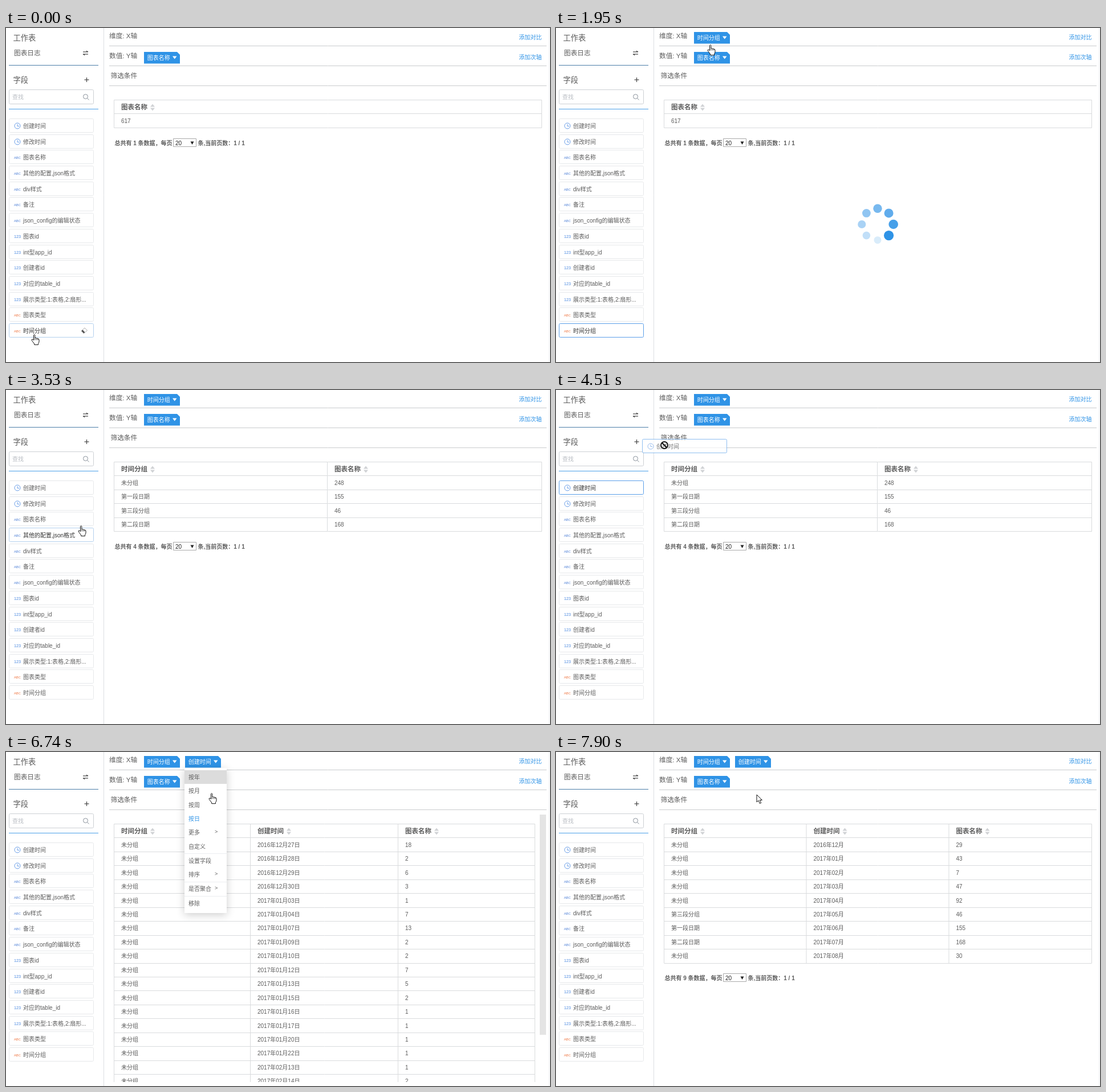
Recreate the animation shown at these times as an HTML page with a canvas. Size 954 px wide and 587 px high, loop 8000 ms.

```html
<!DOCTYPE html>
<html lang="zh-CN">
<head>
<meta charset="utf-8">
<title>图表编辑</title>
<style>
html, body { margin: 0; width: 100%; height: 100%; overflow: hidden; background: #fff; }
canvas { display: block; }
</style>
</head>
<body>
<canvas id="stage" width="954" height="587"></canvas>
<script>
const ctx = document.getElementById('stage').getContext('2d');
const LOOP = 8000, STEP = 88.3;
const FONT = '"Liberation Sans", "Noto Sans CJK SC", "Noto Sans CJK JP", "Noto Sans CJK", sans-serif';
const CENTERED = '"Liberation Sans", "Noto Sans CJK TC", "Noto Sans CJK", sans-serif'; // centred punctuation
const BLUE = '#2f93e6', INK = '#5c5c5c';
const FIELDS = ['创建时间', '修改时间', '图表名称', '其他的配置,json格式', 'div样式', '备注',
  'json_config的编辑状态', '图表id', 'int型app_id', '创建者id', '对应的table_id',
  '展示类型:1:表格,2:扇形...', '图表类型', '时间分组'];
const ROW = 27.69, FIRST = 172;

// Pointer hot spot: time, x, y
const PATH = [[0, 49, 538], [90, 49, 538], [180, 57, 527.5], [330, 57, 527.5], [971, 249, 62.5],
  [1150, 267, 26], [1330, 270, 28], [1943, 270, 29], [2290, 215, 115], [3170, 122, 296],
  [3440, 130, 250], [3532, 131, 238], [4060, 43, 170], [4120, 43, 170], [4950, 361, 11],
  [5120, 350, 15], [5380, 350, 15], [5400, 349, 14], [6130, 349, 14], [6300, 360, 14],
  [6540, 360, 14], [6622, 360, 45], [6711, 360, 72], [6970, 360, 91], [7150, 360, 91],
  [7630, 353, 75], [7810, 352, 75], [LOOP, 352, 75]];
const DRAGS = [
  { field: 13, press: 180, start: 360, drop: 1500, done: 2280, dx: 52, dy: 8 },
  { field: 0, press: 4100, start: 4150, drop: 5380, done: 5730, dx: 38, dy: 10 }];
const MENU_OPEN = 6470, MENU_CLOSE = 7810;

const day = s => `20${s.slice(0, 2)}年${s.slice(2, 4)}月${s.slice(4)}日`;
const DAYS = '161227 161228 161229 161230 170103 170104 170107 170109 170110 170112 170113 170115 170116 170117 170120 170122 170213 170214'.split(' ');
const DAY_COUNTS = [18, 2, 6, 3, 1, 7, 13, 2, 2, 7, 5, 2, 1, 1, 1, 1, 1, 2];
const MONTHS = ['2016年12月', ...[1, 2, 3, 4, 5, 6, 7, 8].map(m => `2017年0${m}月`)];
const MONTH_COUNTS = [29, 43, 7, 47, 92, 46, 155, 168, 30];
const PARTS = { 5: '第三段分组', 6: '第一段日期', 7: '第二段日期' };
const TABLES = [
  { until: 2280, edges: [189.5, 939.5], head: ['图表名称'], rows: [[617]] },
  { until: 5730, edges: [189.5, 563.5, 939.5], head: ['时间分组', '图表名称'],
    rows: [['未分组', 248], ['第一段日期', 155], ['第三段分组', 46], ['第二段日期', 168]] },
  { until: 7900, edges: [189.5, 428.5, 687.5, 927.5], head: ['时间分组', '创建时间', '图表名称'], scroll: true,
    rows: DAYS.map((d, i) => ['未分组', day(d), DAY_COUNTS[i]]) },
  { until: LOOP, edges: [189.5, 439, 689, 939.5], head: ['时间分组', '创建时间', '图表名称'],
    rows: MONTHS.map((m, i) => [PARTS[i] || '未分组', m, MONTH_COUNTS[i]]) }];
// Label, centre y
const MENU = [['按年', 44], ['按月', 68], ['按周', 93], ['按日', 117], ['更多', 141, '>'], ['自定义', 166],
  ['设置字段', 191], ['排序', 215, '>'], ['是否聚合', 240, '>'], ['移除', 266]];

const HAND = new Path2D('M4 1.5Q5.2 -.5 6.3 1.5V7Q8 5.8 8.8 7.4Q10.4 6.5 11.2 8.2Q13.4 7.7 13.5 10V13Q13.4 15 12 16.5V18.7H5.2V17L1 11.5Q-.2 9.3 1.5 9Q2.8 9 4 10.8Z');
const ARROW = new Path2D('M0 0V13L3.1 10.3L5.3 15.5L7.6 14.5L5.4 9.5H9.4Z');

function text(s, x, y, size = 10, color = INK, weight = '', font = FONT) {
  ctx.font = `${weight} ${size}px ${font}`;
  ctx.fillStyle = color;
  ctx.fillText(s, x, y + size * 0.37);
}
function line(color, width, ...p) {
  ctx.strokeStyle = color;
  ctx.lineWidth = width;
  ctx.beginPath();
  for (let i = 0; i < p.length; i += 2) ctx.lineTo(p[i], p[i + 1]);
  ctx.stroke();
}
function poly(color, ...p) {
  ctx.fillStyle = color;
  ctx.beginPath();
  for (let i = 0; i < p.length; i += 2) ctx.lineTo(p[i], p[i + 1]);
  ctx.fill();
}
function circle(x, y, r, color, width) {
  ctx.beginPath();
  ctx.arc(x, y, r, 0, 7);
  ctx.fillStyle = ctx.strokeStyle = color;
  ctx.lineWidth = width;
  width ? ctx.stroke() : ctx.fill();
}
function box(x, y, w, h, border, radius = 2) {
  ctx.beginPath();
  ctx.roundRect(x, y, w, h, radius);
  ctx.fillStyle = '#fff';
  ctx.fill();
  ctx.strokeStyle = border;
  ctx.lineWidth = 1;
  ctx.stroke();
}

function pointer(t) {
  const i = Math.max(1, PATH.findIndex(k => k[0] > t));
  const [t0, x0, y0] = PATH[i - 1], [t1, x1, y1] = PATH[i];
  const f = Math.max(0, (t - t0) / (t1 - t0));
  return { x: x0 + (x1 - x0) * f, y: y0 + (y1 - y0) * f };
}
function rowAt({ x, y }) {
  const i = Math.round((y - FIRST) / ROW);
  const inside = x > 5 && x < 154 && Math.abs(y - FIRST - i * ROW) < 13;
  return inside && i >= 0 && i < FIELDS.length ? i : -1;
}

function field(i, x, y, state, eraser) {
  const c = y + 12.5;
  box(x, y, 148, 24, { active: '#5b9fe9', hover: '#b3d0ee' }[state] || '#e6e8ea');
  if (i < 2) {
    circle(x + 14.5, c, 5, '#6b9fe8', 1);
    line('#6b9fe8', 1, x + 14.5, c - 3, x + 14.5, c + .5, x + 17.5, c + .5);
  } else if (i > 6 && i < 12) text('123', x + 8.5, c + .5, 7.3, '#4d8ae0');
  else text('ABC', x + 8.5, c + .5, 5.8, i > 11 ? '#ee7440' : '#4d7fd6');
  text(FIELDS[i], x + 24.5, c, 10, state ? '#333' : INK);
  if (eraser) {
    line('#999', .8, x + 128.7, c - 1.5, x + 132.5, c - 5, x + 137, c - .5, x + 133, c + 3);
    poly('#555', x + 126.5, c + .5, x + 128.7, c - 1.7, x + 133, c + 2.8, x + 131, c + 5);
  }
}

function chip(label, x, y) {
  poly(BLUE, x, y, x + 58, y, x + 63, y + 5, x + 63, y + 20.5, x, y + 20.5);
  text(label, x + 5.7, y + 10.5, 10, '#fff');
  poly('#fff', x + 50, y + 7.5, x + 57.5, y + 7.5, x + 53.7, y + 12.5);
}

function sidebar(t, hover) {
  line('#dcdfe3', 1, 171.5, 0, 171.5, 587);
  text('工作表', 12.5, 17.5, 13.3);
  text('图表日志', 14, 44, 11.67);
  line('#444', 1.2, 135, 42, 144, 42);
  line('#444', 1.2, 135, 46, 144, 46);
  poly('#444', 141, 39.5, 144.5, 42, 141, 42);
  poly('#444', 138, 48.5, 134.5, 46, 138, 46);
  line('#4a7ea8', 1, 5, 65.5, 162, 65.5);
  text('字段', 12.5, 91.5, 13.3);
  line('#444', 1.2, 137.5, 91, 145.5, 91);
  line('#444', 1.2, 141.5, 87, 141.5, 95);
  box(5.5, 108.5, 148, 25, '#ccd0d4');
  text('查找', 11, 121, 10, '#b8bcc2');
  circle(139.5, 120.5, 4, '#858d98', 1);
  line('#858d98', 1, 142.5, 123.5, 145.5, 126.5);
  line('#4a9fe8', 1.2, 5, 142.5, 162, 142.5);
  FIELDS.forEach((_, i) => {
    const held = DRAGS.some(d => d.field === i && t >= d.press && t < d.done);
    const grabbed = DRAGS.some(d => d.field === i && t >= d.press && t < d.drop);
    const state = held ? 'active' : hover === i ? 'hover' : '';
    field(i, 5.5, Math.round(FIRST + i * ROW) - 12.5, state, i > 11 && (grabbed || hover === i));
  });
}

function header(t) {
  line('#eceef0', 1, 952.5, 0, 952.5, 587);
  [31, 66, 101].forEach(y => line('#c9cbcd', 1, 181, y + .5, 948, y + .5));
  text('维度: X轴', 181, 13.5, 11.67);
  text('数值: Y轴', 181, 48.5, 11.67);
  text('筛选条件', 183.5, 83.5, 11.67);
  text('添加对比', 899.5, 16, 10, BLUE);
  text('添加次轴', 899.5, 51, 10, BLUE);
  chip('图表名称', 242, 42);
  if (t >= DRAGS[0].drop) chip('时间分组', 242, 7);
  if (t >= DRAGS[1].drop) chip('创建时间', 314, 7);
}

function table({ edges, head, rows, scroll }) {
  const H = 24.45, top = 126.5, left = edges[0], right = edges.at(-1);
  const bottom = top + H * (rows.length + 1);
  const snap = y => Math.floor(y) + .5;
  ctx.save();
  ctx.beginPath();
  ctx.rect(180, 102, 770, 478);
  ctx.clip();
  for (let i = 0; i <= rows.length + 1; i++) line('#d9dbdd', 1, left, snap(top + i * H), right, snap(top + i * H));
  edges.forEach(x => line('#d9dbdd', 1, x, top, x, bottom));
  head.forEach((s, i) => {
    const x = edges[i] + 12.5;
    text(s, x, 139, 11.5, INK, 'bold');
    poly('#d0d2d5', x + 51, 138.5, x + 55, 133.5, x + 59, 138.5);
    poly('#d0d2d5', x + 51, 140.5, x + 55, 145.5, x + 59, 140.5);
  });
  rows.forEach((r, j) => r.forEach((s, i) => text(s, edges[i] + 12.5, 163 + j * H)));
  ctx.restore();
  if (scroll) {
    ctx.fillStyle = '#e4e4e4';
    ctx.fillRect(936, 110, 11, 387);
    return;
  }
  const y = Math.ceil(bottom + 25.9);
  text(`总共有 ${rows.length} 条数据，每页`, 190.5, y, 10, INK, 'bold', CENTERED);
  box(293.5, y - 7.5, 40, 14, '#a9a9a9', 0);
  text('20', 297, y, 10, '#222');
  poly('#222', 323.5, y - 2.5, 329.5, y - 2.5, 326.5, y + 3);
  text('条,当前页数：1 / 1', 336.5, y, 10, INK, 'bold', CENTERED);
}

function spinner(t) {
  const head = 1 + Math.round((t - 1943) / STEP);
  for (let i = 0; i < 8; i++) {
    const a = (head - i) * Math.PI / 4;
    ctx.globalAlpha = 1 - i * .117;
    circle(564 + 27.7 * Math.cos(a), 345 + 27.7 * Math.sin(a), 8.6 - i * .3, BLUE);
  }
  ctx.globalAlpha = 1;
}

function menu(at) {
  ctx.save();
  ctx.shadowColor = 'rgba(0,0,0,.2)';
  ctx.shadowBlur = 14;
  ctx.shadowOffsetY = 3;
  ctx.fillStyle = '#fff';
  ctx.fillRect(313, 28, 74, 255);
  ctx.restore();
  [178.5, 228.5, 253.5].forEach(y => line('#eceef0', 1, 313, y, 387, y));
  MENU.forEach(([label, y, more], i) => {
    if (Math.abs(at.y - y) < 12.2) {
      ctx.fillStyle = '#dcdcdc';
      ctx.fillRect(313, y - 12, 74, 24);
    }
    text(label, 320, y, 10, i === 3 ? BLUE : INK);
    if (more) text(more, 366, y - 1, 9);
  });
}

function cursor(kind, { x, y }) {
  ctx.save();
  ctx.translate(Math.round(x), Math.round(y));
  ctx.lineJoin = 'round';
  if (kind === 'no') {
    circle(0, 0, 6, '#fff', 4);
    circle(0, 0, 6, '#111', 2);
    line('#111', 2, -4.2, -4.2, 4.2, 4.2);
  } else {
    const hand = kind === 'hand', shape = hand ? HAND : ARROW;
    if (hand) ctx.translate(-4.5, 0);
    ctx.fillStyle = '#fff';
    ctx.strokeStyle = '#111';
    ctx.lineWidth = 1;
    ctx.fill(shape);
    ctx.stroke(shape);
    if (hand) [6.3, 8.8, 11.2].forEach(f => line('#111', .8, f, 7.5, f, 10.5));
    if (kind === 'copy') {
      box(1.5, 13.5, 9, 6, '#333', 0);
      line('#777', 1, 3, 15.5, 9, 15.5);
    }
  }
  ctx.restore();
}

function draw(t) {
  const step = Math.floor(t / STEP + .05) * STEP;
  const at = pointer(step), before = pointer(Math.max(0, step - STEP));
  const drag = DRAGS.find(d => t >= d.start && t < d.drop);
  const open = t >= MENU_OPEN && t < MENU_CLOSE;
  const hover = drag ? -1 : rowAt(before);

  ctx.fillStyle = '#fff';
  ctx.fillRect(0, 0, 954, 587);
  sidebar(t, hover);
  header(t);
  table(TABLES.find(s => t < s.until));
  if (DRAGS.some(d => t >= d.drop + STEP && t < d.done)) spinner(step);
  if (open) menu(before);
  if (drag) {
    ctx.globalAlpha = .68;
    field(drag.field, Math.floor(at.x - drag.dx) + .5, Math.floor(at.y - drag.dy) + .5, 'active', drag.field > 11);
    ctx.globalAlpha = 1;
  }
  const onLink = hover >= 0 || open || (at.y < 30 && at.x > 240);
  cursor(drag ? (at.y < 30 ? 'copy' : 'no') : onLink ? 'hand' : 'arrow', at);
}

const begin = performance.now();
function tick() {
  draw((performance.now() - begin) % LOOP);
  requestAnimationFrame(tick);
}
tick();
</script>
</body>
</html>
```
